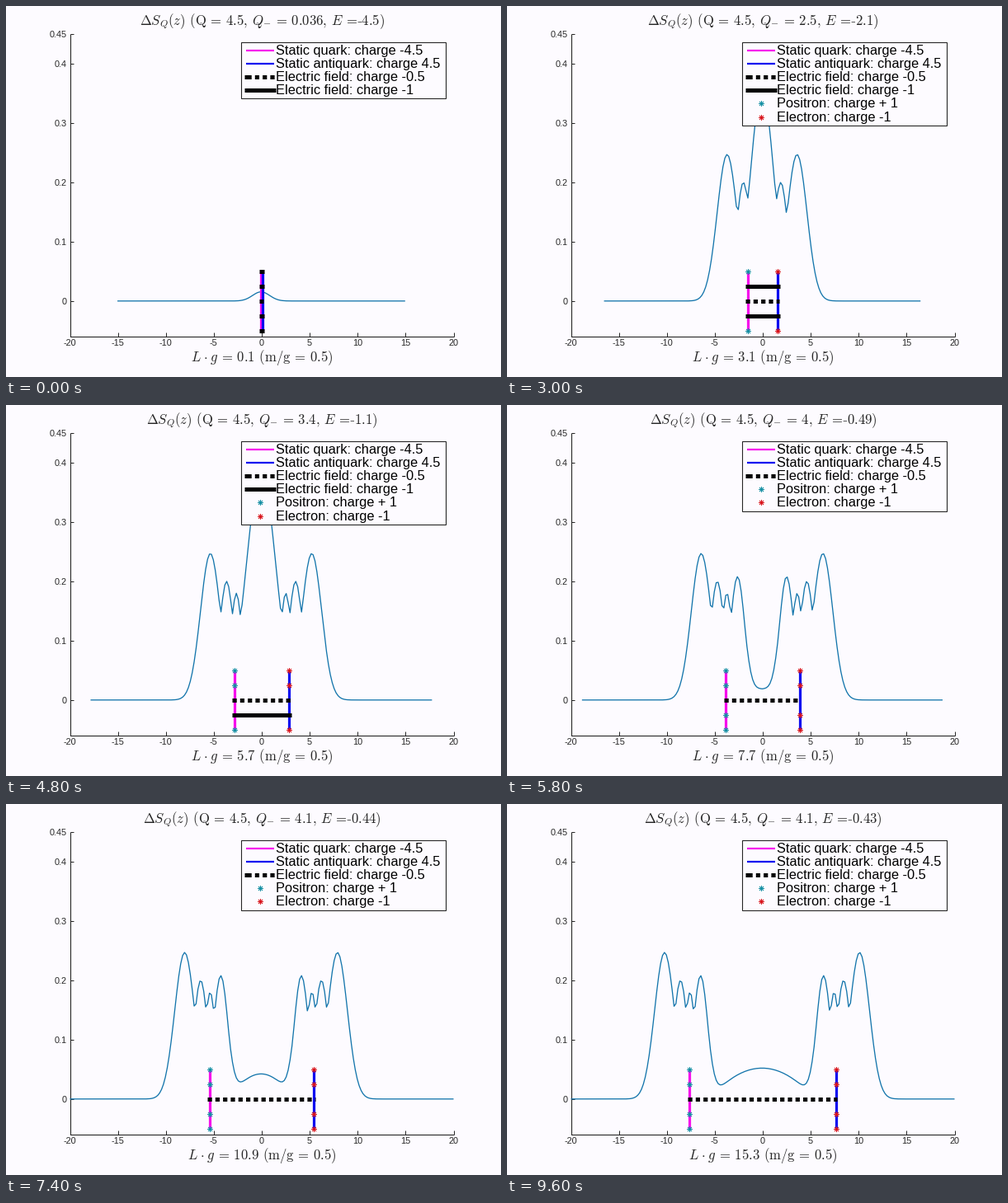
Write a matplotlib script that moves like this. It is 600 px wide and 450 px high and loops after 9800 ms.

```python
import numpy as np
import matplotlib.pyplot as plt
from matplotlib.animation import FuncAnimation
from matplotlib.patches import Rectangle

W, H, DPI = 600, 450, 100
PT = 72 / DPI
FRAMES, STEP_MS = 49, 200

BACK, INK = "#fdfbff", "#262626"
CURVE, MAGENTA, BLUE = "#1274ab", "#f60cec", "#0a0af0"
TEAL, RED = "#158fa3", "#d8141c"

plt.rcParams["mathtext.fontset"] = "cm"
plt.rcParams["lines.scale_dashes"] = False

LEFT, RIGHT, TOP, BOTTOM = 77.5, 542.5, 34, 401
UNIT = (RIGHT - LEFT) / 40
CENTRE = -0.07

# Crests that leave the centre one by one and settle beside each charge:
# (resting offset in pixels, height, width, separation at which it appears)
CRESTS = [(29.3, 0.247, 12.0, 0.0),
          (9.9, 0.200, 8.4, 1.5),
          (-1.6, 0.180, 6.6, 3.1),
          (-14.4, 0.208, 8.7, 5.7)]
BREAK = CRESTS[-1][3]
SHARP = 16


def px(x):
    return LEFT + (x + 20) * UNIT


def py(y):
    return BOTTOM - (y + 0.06) * (BOTTOM - TOP) / 0.51


def ramp(x, start, length=1.5):
    t = np.clip((x - start) / length, 0, 1)
    return t * t * (3 - 2 * t)


def rise(x, scale):
    return 1 - np.exp(-max(x, 0) / scale)


def bell(d, width):
    return np.exp(-0.5 * (d / width) ** 2)


def entropy(x, sep):
    """Sharp maximum of the crests and a central hump, plus a late plateau."""
    dist = np.abs(x - CENTRE) * UNIT
    half = sep / 2 * UNIT
    hump = 0.39 * rise((sep / 1.45) ** 1.2, 1) * (1 - ramp(sep, BREAK))
    parts = [hump * bell(dist, 10.2 + 1.25 * sep)]
    for j, (rest, height, width, start) in enumerate(CRESTS):
        at = (half + rest) * rise(sep - 0.8 * j, 1.37)
        parts.append(height * ramp(sep, start) * bell(dist - at, width))
    crests = sum(p ** SHARP for p in parts) ** (1 / SHARP)
    reach = max(half - 25.4, 1)
    plateau = 0.055 * rise(sep - 6.5, 3)
    return crests + plateau * np.maximum(1 - (dist / reach) ** 2, 0)


def charge_and_field(sep):
    charge = np.interp(sep, [0.1, 1.5, 3.1, 5.7, 7.7, 10.9, 12.9],
                       [0.036, 1.4, 2.46, 3.4, 4.03, 4.08, 4.09])
    field = 4.52 - charge + 2.5 * sep ** 2 * np.exp(-2 * sep)
    return charge, field


fig = plt.figure(figsize=(W / DPI, H / DPI), dpi=DPI, facecolor=BACK)
ax = fig.add_axes([0, 0, 1, 1])


def line(xs, ys, color, width, z=2, dashes=None):
    style = (0, [d * PT for d in dashes]) if dashes else "-"
    ax.plot(xs, ys, color=color, lw=width * PT, ls=style, zorder=z,
            solid_capstyle="butt", dash_capstyle="butt")


def dots(x0, x1, y, z):
    line([x0, x1], [y, y], "black", 5, z, (5.2, 4.1))


def star(x, y, color, z=6):
    ax.plot([x], [y], marker=(8, 2, 0), ms=7 * PT, mew=0.8 * PT,
            mec=color, ls="none", zorder=z)


def label(x, y, text, size, family="Liberation Sans", ha="left", color=INK, z=3):
    ax.text(x, y, text, fontsize=size * PT, family=family, ha=ha,
            va="baseline", color=color, zorder=z)


def draw_axes():
    line([LEFT, LEFT, RIGHT], [TOP, BOTTOM, BOTTOM], INK, 1.1)
    for x in range(-20, 21, 5):
        line([px(x)] * 2, [BOTTOM, BOTTOM - 4.6], INK, 1)
        label(px(x), 412.5, str(x), 10.9, ha="center")
    for y in (0, 0.1, 0.2, 0.3, 0.4, 0.45):
        line([LEFT, LEFT + 4.6], [py(y)] * 2, INK, 1)
        label(73.5, py(y) + 3.7, f"{y:g}", 10.9, ha="right")


def draw_titles(sep, charge, field):
    side = r"\hspace{0.19}"
    gap = r"\hspace{0.38}"
    eq = f"{side}={side}"
    comma = rf",{side}"
    title = (rf"$\Delta S_Q(z){gap}(\mathrm{{Q}}{eq}4.5{comma}"
             rf"Q_{{-}}{eq}{charge:.2g}{comma}"
             rf"E{side}=\hspace{{-0.2}}$-${field:.2g})$")
    below = (rf"$L\hspace{{0.06}}\cdot\hspace{{0.06}}g{eq}{sep:.1f}{gap}"
             rf"(\mathrm{{m/g}}{eq}0.5)$")
    label(310.5, 23.5, title, 16.7, "Liberation Serif", "center")
    label(310.5, 430.5, below, 16.7, "Liberation Serif", "center")


def draw_strings(sep, pairs):
    x0, x1 = px(-sep / 2), px(sep / 2)
    for x, color in ((x0, MAGENTA), (x1, BLUE)):
        line([x, x], [py(0.05), py(-0.05)], color, 3.2, 4)
    for i, level in enumerate((0.05, -0.05, 0.025, -0.025)):
        y = py(level)
        if i < pairs:
            star(x0, y, TEAL)
            star(x1, y, RED)
        else:
            line([x0 - 2.5, x1 + 2.5], [y, y], "black", 5, 5)
    dots(x0 - 2.5, x1 + 1.5, py(0), 5)


def draw_legend(pairs):
    rows = [("Static quark: charge -4.5", MAGENTA, "thin"),
            ("Static antiquark: charge 4.5", BLUE, "thin"),
            ("Electric field: charge -0.5", "black", "dots")]
    if pairs < 4:
        rows.append(("Electric field: charge -1", "black", "bar"))
    if pairs:
        rows += [("Positron: charge + 1", TEAL, "star"),
                 ("Electron: charge -1", RED, "star")]
    ax.add_patch(Rectangle((285, 43.5), 247.5, 16.2 * len(rows) + 4, fc=BACK,
                           ec=INK, lw=1.1 * PT, zorder=8))
    for i, (text, color, kind) in enumerate(rows):
        y = 53.8 + 16.15 * i
        if kind == "thin":
            line([290.5, 324.5], [y, y], color, 2.2, 9)
        elif kind == "dots":
            line([289, 293], [y, y], color, 5, 9)
            dots(292, 326, y, 9)
        elif kind == "bar":
            line([289, 326.5], [y, y], color, 5, 9)
        else:
            star(308, y, color, 9)
        label(327, y + 5, text, 16.4, color="black", z=9)


def update(i):
    ax.clear()
    ax.set_xlim(0, W)
    ax.set_ylim(H, 0)
    ax.axis("off")
    sep = 0.1 + 0.2 * min(i, 20) + 0.4 * max(i - 20, 0)
    charge, field = charge_and_field(sep)
    pairs = round(4.5 - field)
    reach = 15 + sep / 2
    x = np.arange(-reach, reach + 0.01, 0.2)
    draw_axes()
    draw_titles(sep, charge, field)
    line(px(np.clip(x, -20, 20)), py(entropy(x, sep)), CURVE, 1.3, 3)
    draw_strings(sep, pairs)
    draw_legend(pairs)
    return []


anim = FuncAnimation(fig, update, frames=FRAMES, interval=STEP_MS,
                     init_func=lambda: [], repeat=True, repeat_delay=0)
plt.show()
```
